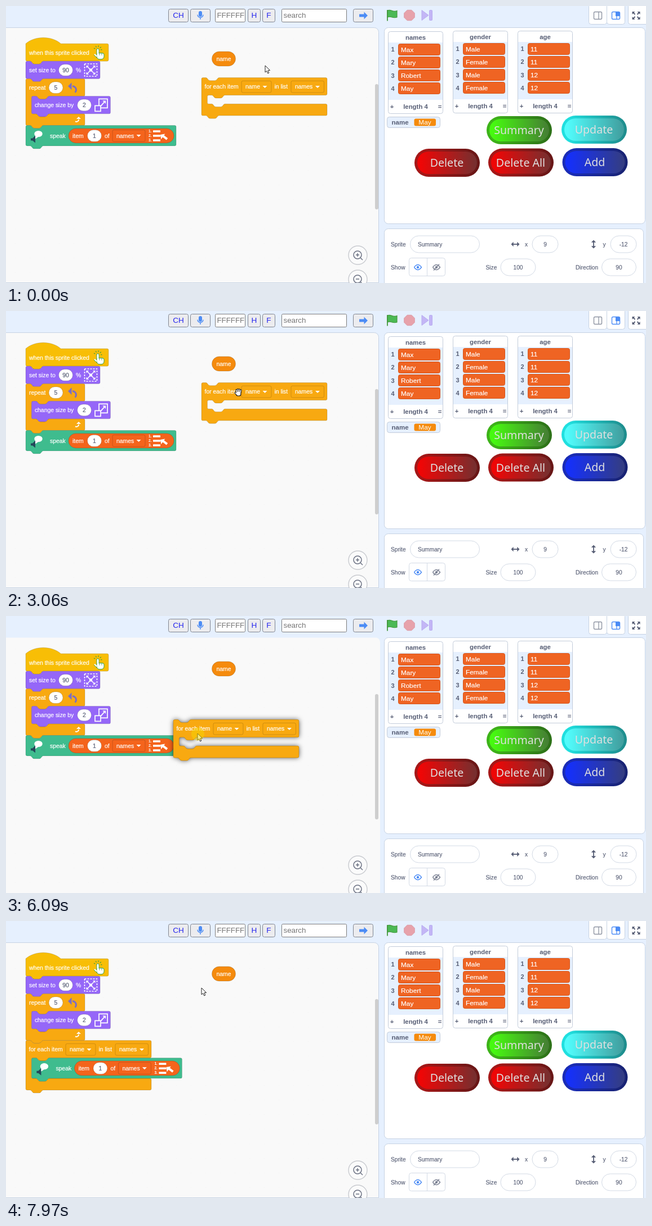
Write an HTML page with a canvas that moves like this. It is 1136 px wide and 493 px high and loops after 8000 ms.

```html
<!DOCTYPE html>
<html lang="en">
<head>
<meta charset="utf-8">
<title>Block editor</title>
<style>
html, body { margin: 0; width: 100%; height: 100%; overflow: hidden; background: #e6f0fe; }
canvas { display: block; }
</style>
</head>
<body>
<canvas id="stage" width="1136" height="493"></canvas>
<script>
const ctx = document.getElementById('stage').getContext('2d');
const LOOP = 8000, STEP = 80, UNIT = 0.65, TAU = Math.PI * 2;
const SANS = '"Liberation Sans", Arial, sans-serif';
const NOTO = '"Noto Sans", "Open Sans", sans-serif';
const SKY = '#e6f0fe', INK = '#575e75', BLUE = '#4c8cf5', EDGE = '#c6d2e3', SHADE = 'rgba(0,0,0,.16)';
const EVENT = '#f8be06', CONTROL = '#f8a911', LOOKS = '#9567f8', SPEECH = '#3fbc8e',
  LIST = '#f4641c', DATA = '#f58b0d', MARKER = '#b3b3b3';

// Paths: each takes progress k and the point where the pointer was.
const to = (x, y) => (k, [fx, fy]) => [fx + (x - fx) * k, fy + (y - fy) * k];
const orbit = (cx, cy, rx, ry, a0, a1) => k => {
  const a = (a0 + (a1 - a0) * k) * TAU / 360;
  return [cx + rx * Math.cos(a), cy + ry * Math.sin(a)];
};
const bend = (p1, p2, p3) => (k, p0) => {
  const j = 1 - k;
  return [0, 1].map(i => j * j * j * p0[i] + 3 * j * j * k * p1[i] + 3 * j * k * k * p2[i] + k * k * k * p3[i]);
};

const HOME = [460, 106], GRIP = [43, 24.5];
const GRAB = 5850, SNAP = 6490, DROP = 6960;
const MOVES = [
  [850, 1330, to(397, 61)],
  [1410, 1630, orbit(385, 88, 37, 28, -70, -430)],
  [1710, 1790, to(384, 92)],
  [1950, 2270, to(412, 149)],
  [2350, 2680, orbit(445, 149, 33, 25, 180, 57)],
  [2760, 3060, orbit(445, 149, 33, 25, 57, -170)],
  [3470, 4200, to(546, 157)],
  [4280, 4670, to(503, 153)],
  [5450, 5770, to(390, 152)],
  [GRAB + STEP, 6570, bend([460, 198], [77, 301], [76, 246.5])],
  [DROP, DROP, to(79, 250)],
  [7740, 7970, to(347, 119)]
];

function pointerAt(t) {
  let p = HOME;
  for (const [start, end, path] of MOVES) {
    if (t < start) break;
    const gaps = Math.round((end - start) / STEP);
    const done = end > start ? Math.min(gaps, Math.floor((t - start) / (end - start) * gaps + 1e-6)) : 0;
    p = path((done + 1) / (gaps + 1), p);
  }
  return p;
}

// Drawing helpers
function text(s, x, y, size, color, { align = 'left', bold = false, font = SANS, weight = 0 } = {}) {
  ctx.font = `${bold ? 'bold ' : ''}${size}px ${font}`;
  ctx.textAlign = align;
  ctx.fillStyle = ctx.strokeStyle = color;
  ctx.fillText(s, x, y + size * 0.36);
  if (weight) { ctx.lineWidth = weight; ctx.strokeText(s, x, y + size * 0.36); }
}
const label = (s, x, y, align) => text(s, x, y, 10.4, '#fff', { align, weight: 0.2 });

function paint(fill, stroke, width = 1) {
  if (fill) { ctx.fillStyle = fill; ctx.fill(); }
  if (stroke) { ctx.strokeStyle = stroke; ctx.lineWidth = width; ctx.stroke(); }
}
function box(x, y, w, h, r, fill, stroke, width) {
  ctx.beginPath();
  ctx.roundRect(x, y, w, h, r);
  paint(fill, stroke, width);
}
// A box whose one-pixel border lies inside whole pixels.
function frameBox(x, y, w, h, r, fill, stroke) {
  box(Math.round(x) + 0.5, Math.round(y) + 0.5, w - 1, h - 1, r, fill, stroke);
}
function dot(x, y, r, fill, stroke, width) {
  ctx.beginPath();
  ctx.arc(x, y, r, 0, TAU);
  paint(fill, stroke, width);
}
function shape(points, fill, stroke, width) {
  ctx.beginPath();
  points.forEach(([x, y]) => ctx.lineTo(x, y));
  ctx.closePath();
  paint(fill, stroke, width);
}
function line(color, width, x1, y1, x2, y2) {
  ctx.beginPath();
  ctx.moveTo(x1, y1);
  ctx.lineTo(x2, y2);
  paint(null, color, width);
}
function at(x, y, draw, turn = 0) {
  ctx.save();
  ctx.translate(x, y);
  ctx.rotate(turn);
  draw();
  ctx.restore();
}
// A triangle pointing right, with its tip at the given place.
function head(x, y, size, color, turn = 0) {
  at(x, y, () => shape([[0, 0], [-size, -size], [-size, size]], color), turn);
}
function corners(draw) {
  for (const i of [-1, 1]) for (const j of [-1, 1]) draw(i, j);
}

// Blocks
function notch(x, y, d) {
  ctx.lineTo(x, y);
  ctx.bezierCurveTo(x + 5 * d, y, x + 5 * d, y + 8, x + 12 * d, y + 8);
  ctx.lineTo(x + 24 * d, y + 8);
  ctx.bezierCurveTo(x + 31 * d, y + 8, x + 31 * d, y, x + 36 * d, y);
}
function block(x, y, width, fill, { hat = false, mouth = 0, tall = 48, lifted = false } = {}) {
  const w = width / UNIT, low = 48 + mouth, h = mouth ? low + 32 : tall;
  ctx.save();
  ctx.translate(x, y);
  ctx.scale(UNIT, UNIT);
  ctx.beginPath();
  if (hat) {
    ctx.moveTo(0, 0);
    ctx.bezierCurveTo(25, -22, 71, -22, 96, 0);
  } else {
    ctx.moveTo(0, 4);
    ctx.quadraticCurveTo(0, 0, 4, 0);
    notch(12, 0, 1);
  }
  ctx.arcTo(w, 0, w, 4, 4);
  if (mouth) {
    ctx.arcTo(w, 48, w - 4, 48, 4);
    notch(64, 48, -1);
    ctx.arcTo(16, 48, 16, 52, 4);
    ctx.arcTo(16, low, 20, low, 4);
    notch(28, low, 1);
    ctx.arcTo(w, low, w, low + 4, 4);
  }
  ctx.arcTo(w, h, w - 4, h, 4);
  notch(48, h, -1);
  ctx.arcTo(0, h, 0, h - 4, 4);
  ctx.closePath();
  if (lifted) {
    ctx.shadowColor = 'rgba(0,0,0,.65)';
    ctx.shadowBlur = 9;
    paint(fill);
    ctx.shadowColor = 'transparent';
  }
  paint(fill, SHADE, 1.4);
  ctx.restore();
}
function field(s, cx, cy) {
  box(cx - 12.5, cy - 10.3, 25, 20.6, 10.3, '#fff', SHADE);
  text(s, cx, cy, 10.4, INK, { align: 'center', weight: 0.2 });
}
function menu(s, x, cy, w) {
  box(x, cy - 10.4, w, 20.8, 2.6, null, SHADE);
  label(s, x + 7, cy);
  head(x + w - 11.5, cy + 2.2, 4, '#fff', TAU / 4);
}

function clickIcon() {
  const green = '#2f9e44';
  for (let a = -160; a <= 0; a += 40) {
    const c = Math.cos(a * TAU / 360), s = Math.sin(a * TAU / 360);
    line(green, 1.1, -2 + 5 * c, -6 + 5 * s, -2 + 7.5 * c, -6 + 7.5 * s);
  }
  box(-4, -8, 4, 14, 2, '#fff', green);
  box(-4, 0, 13, 11, [2, 3, 5, 5], '#fff', green);
  line('#fff', 2.6, -2, -5, -2, 5);
  line('#fff', 2.4, -4, 6, -8, 2);
  line(green, 1, -4, 8, -9, 3);
  for (const x of [1, 5]) line(green, 0.8, x, 0, x, 4);
}
function fitIcon() {
  ctx.setLineDash([3, 2]);
  box(-11, -11, 22, 22, 0, null, '#fff', 1.6);
  ctx.setLineDash([]);
  corners((i, j) => {
    line('#fff', 1.5, 0, 0, i * 6, j * 6);
    shape([[i * 8, j * 8], [i * 8, j * 3.5], [i * 3.5, j * 8]], '#fff');
  });
  box(-2.5, -2.5, 5, 5, 0, '#fff');
}
function growIcon() {
  box(-4, -11, 15, 16, 0, null, '#fff', 1.7);
  box(-11, 1, 10, 10, 0, LOOKS, '#fff', 1.7);
  line('#fff', 1.7, -1, 2, 6, -6);
  head(8, -8, 4, '#fff', -TAU / 8);
}
function undoIcon() {
  ctx.beginPath();
  ctx.arc(-1, 4, 6.5, -TAU / 4, TAU / 8);
  paint(null, '#7b6ec6', 3);
  head(-9, -2.5, 6.5, '#7b6ec6', TAU / 2);
}
function repeatIcon() {
  ctx.beginPath();
  ctx.arc(-2, 0, 4, 0, TAU / 3);
  paint(null, '#fff', 2);
  head(2, -5, 4, '#fff', -TAU / 4);
}
function speechIcon() {
  shape([[-13, 5], [-10, 5], [-5, 0], [-5, 13], [-10, 9], [-13, 9]], '#24485a');
  ctx.beginPath();
  ctx.ellipse(0.5, -3, 7.2, 5.6, 0, 0, TAU);
  paint('#fff');
  shape([[-5, 0], [-5, 6], [1, 2]], '#fff');
}
function listIcon() {
  for (let i = 0; i < 3; i++) {
    text(`${i + 1}.`, 0, i * 8, 6.5, '#fff', { bold: true });
    box(8, i * 8 - 1.6, 13, 3.4, 0.5, '#fff');
  }
  line('#fff', 4, 25, 8, 33, 14);
  head(21, 6, 6, '#fff', TAU * 0.6);
}

function speakBlock(x, y) {
  block(x, y, 267, SPEECH, { tall: 56 });
  at(x + 22, y + 18, speechIcon);
  const cy = y + 18.4;
  label('speak', x + 43, cy);
  box(x + 76, cy - 13, 187, 26, 13, LIST, SHADE);
  label('item', x + 83, cy);
  field('1', x + 122, cy);
  label('of', x + 140, cy);
  menu('names', x + 154, cy, 58);
  at(x + 218, cy - 8, listIcon);
}
function eachBlock(x, y, options) {
  block(x, y, 223, CONTROL, options);
  const cy = y + 16.2;
  label('for each item', x + 5.5, cy);
  menu('name', x + 71, cy, 53);
  label('in list', x + 129.5, cy);
  menu('names', x + 159, cy, 58.5);
}

function scripts(t, held) {
  const left = 35, inner = left + 16 * UNIT, row = 48 * UNIT;
  const rows = [0, 1, 2, 3].map(i => 67 + row * i), low = 212.5, nested = t >= SNAP;
  const mid = i => rows[i] + 15.8;
  block(left, rows[0], 147, EVENT, { hat: true });
  label('when this sprite clicked', left + 6, mid(0));
  at(165, mid(0) + 1, clickIcon);
  block(left, rows[1], 132, LOOKS);
  label('set size to', left + 6, mid(1));
  field('90', 106, mid(1));
  label('%', 124, mid(1));
  at(150.5, mid(1), fitIcon);
  block(left, rows[2], 105, CONTROL, { mouth: 48 });
  label('repeat', left + 6, mid(2));
  field('5', 88.5, mid(2));
  at(119, mid(2), undoIcon);
  at(127, 202, repeatIcon);
  block(inner, rows[3], 140, LOOKS);
  label('change size by', inner + 5.5, mid(3));
  field('2', 139, mid(3));
  at(169, mid(3), growIcon);

  if (t >= DROP) eachBlock(left, low, { mouth: 56 });
  else if (nested) block(left, low, 223, MARKER, { mouth: 56 });
  if (nested) speakBlock(inner, low + row);
  else speakBlock(left, low);

  box(365.5, 81, 42, 26, 13, DATA, SHADE);
  label('name', 386.5, 94, 'center');
  if (t < DROP) {
    const [x, y] = pointerAt(held ? t : GRAB);
    eachBlock(x - GRIP[0], y - GRIP[1], { mouth: 24, lifted: held });
  }
}

// Workspace and header
function workspace(t, held) {
  const right = held ? 664 : 661.5;
  box(-10, 38.5, right + 10, held ? 470 : 454, [0, 8, 0, 0], '#f9f9f9', held ? null : EDGE);
  ctx.fillStyle = '#f3f3f3';
  for (let x = 16; x < 655; x += 26)
    for (let y = 58; y < 490; y += 26) ctx.fillRect(x, y, 1, 1);
  scripts(t, held);
  box(655, 139, 6, 223, 3, '#cecece');
  for (const cy of [443.5, 486.5]) {
    dot(624.5, cy, 16.5, '#fbfbfb', '#c9cbd0', 1.4);
    dot(624, cy - 0.5, 7, null, '#6a7082', 1.5);
    line('#6a7082', 1.5, 629, cy + 4.5, 633, cy + 8.5);
    line('#6a7082', 1.5, 621, cy - 0.5, 627, cy - 0.5);
    if (cy < 450) line('#6a7082', 1.5, 624, cy - 3.5, 624, cy + 2.5);
  }
}
function button(x, w, s = '') {
  frameBox(x, 5, w, 24, 3, '#ececef', '#80858f');
  text(s, x + w / 2, 16.5, 13.6, '#2828ee', { align: 'center' });
}
function input(x, w, s) {
  frameBox(x, 5, w, 24, 2, '#fff', '#7c7c7c');
  text(s, x + 3.5, 16.5, 13.3, '#757575');
}
function header() {
  button(288, 36, 'CH');
  button(327, 36);
  button(429, 23, 'H');
  button(455, 23, 'F');
  button(616, 36);
  input(371, 54, 'FFFFFF');
  input(489, 116, 'search');
  box(342, 9, 6, 10, 3, BLUE);
  ctx.beginPath();
  ctx.arc(345, 15.5, 5, 0, Math.PI);
  paint(null, BLUE, 1.4);
  line(BLUE, 1.4, 345, 20, 345, 24);
  line(BLUE, 5, 627, 17, 636, 17);
  head(642, 17, 6.5, BLUE);

  ctx.beginPath();
  ctx.moveTo(677, 8);
  ctx.bezierCurveTo(684, 5, 686, 12, 694, 8.5);
  ctx.lineTo(694, 20);
  ctx.bezierCurveTo(686, 23, 684, 17, 677, 20);
  ctx.closePath();
  paint('#4cb955', '#45993d', 1.2);
  line('#45993d', 1.8, 677, 7, 677, 26.5);
  const octagon = Array.from({ length: 8 }, (_, i) => {
    const a = (i + 0.5) * TAU / 8;
    return [716 + 10 * Math.cos(a), 16.5 + 10 * Math.sin(a)];
  });
  shape(octagon, '#e7a2ab', '#dc98a4');
  shape([[738, 7.5], [750, 16.5], [738, 25.5]], '#c3b6f6', '#b8abf0');
  box(751.5, 7.5, 5, 18, 1, '#c3b6f6', '#b8abf0');

  for (const [x, color] of [[1034, '#8f95a3'], [1066, BLUE]]) {
    frameBox(x, -4, 33, 37, 4, '#fff', EDGE);
    box(x + 9.5, 10.5, 14, 13, 2, null, color, 1.4);
    if (color === BLUE) box(x + 16, 11, 7.5, 7, 0, color);
    line(color, 1.3, x + 18, 11, x + 18, 23);
  }
  frameBox(1104, -4, 37, 37, 4, '#fff', EDGE);
  corners((i, j) => {
    line(INK, 2, 1118.5 + i * 2, 17 + j * 2, 1118.5 + i * 5, 17 + j * 5);
    head(1118.5 + i * 7, 17 + j * 7, 3.5, INK, Math.atan2(j, i));
  });
}

// Stage and sprite panel
function listMonitor(x, y, title, items) {
  const style = { align: 'center', bold: true };
  frameBox(x, y, 98, 147, 4, '#fff', '#c3ccda');
  ctx.fillStyle = SKY;
  ctx.fillRect(x + 1, y + 20, 96, 102);
  text(title, x + 49, y + 11, 11.4, INK, style);
  items.forEach((item, i) => {
    const cy = y + 32.3 + i * 23.2;
    text(i + 1, x + 8.5, cy, 11, INK, style);
    frameBox(x + 18, cy - 10.5, 75, 21, 3, '#ef6423', '#d6551b');
    text(item, x + 23, cy, 11.8, '#fff', { weight: 0.2 });
  });
  const foot = y + 133.5;
  text('+', x + 7, foot, 11.4, INK, style);
  text(`length ${items.length}`, x + 49, foot, 11.4, INK, style);
  text('=', x + 92, foot, 11.4, INK, style);
}
function pill(x, y, s, hue, light) {
  const blend = (s1, l1, s2, l2) => {
    const g = ctx.createLinearGradient(x, 0, x + 116, 0);
    g.addColorStop(0.1, `hsl(${hue} ${s1}% ${light * l1}%)`);
    g.addColorStop(0.95, `hsl(${hue} ${s2}% ${light * l2}%)`);
    return g;
  };
  box(x, y, 116, 50, 25, blend(75, 0.77, 65, 0.52));
  box(x + 5, y + 5, 106, 40, 20, blend(95, 1, 42, 0.67));
  text(s, x + 57.5, y + 25, 19.6, '#dfdfdf', { align: 'center', font: NOTO });
}
function stage() {
  frameBox(671, 38, 464, 350, 7, '#fff', EDGE);
  listMonitor(678, 45, 'names', ['Max', 'Mary', 'Robert', 'May']);
  listMonitor(793, 44, 'gender', ['Male', 'Female', 'Male', 'Female']);
  listMonitor(908, 44, 'age', ['11', '11', '12', '12']);
  frameBox(676, 197, 95, 20, 4, SKY, '#c3ccda');
  text('name', 684.5, 207, 11.5, INK, { bold: true });
  box(724.5, 200.5, 38.5, 13, 3, DATA);
  text('May', 743.5, 207, 11.8, '#fff', { align: 'center' });
  pill(853, 196, 'Summary', 106, 52);
  pill(986, 195, 'Update', 180, 65);
  pill(725, 254, 'Delete', 0, 48);
  pill(856, 253.5, 'Delete All', 0, 48);
  pill(987.5, 253, 'Add', 233, 53);
}
function eye(x, y, color) {
  ctx.beginPath();
  ctx.moveTo(x - 6.5, y);
  ctx.quadraticCurveTo(x, y - 9, x + 6.5, y);
  ctx.quadraticCurveTo(x, y + 9, x - 6.5, y);
  paint(null, color, 1.4);
  dot(x, y, 2.2, color);
}
function doubleArrow() {
  line(INK, 1.8, -4, 0, 4, 0);
  head(7.5, 0, 4.2, INK);
  head(-7.5, 0, 4.2, INK, TAU / 2);
}
function value(name, s, x, cx, y, w) {
  text(name, x, y, 10.2, INK, { weight: 0.15 });
  box(cx - w / 2, y - 15, w, 30, 15, '#fff', '#d3dae5');
  text(s, cx, y, 10.2, INK, { align: 'center', weight: 0.15 });
}
function panel() {
  const top = 424, low = 465;
  frameBox(671, 396, 461, 111, 7, '#fff', EDGE);
  value('Sprite', '', 683, 779, top, 123);
  text('Summary', 731, top, 10.1, INK, { weight: 0.15 });
  value('x', '9', 921, 957, top, 46);
  value('y', '-12', 1059.5, 1096, top, 46);
  value('Size', '100', 851.5, 909, low, 62);
  value('Direction', '90', 1011, 1088, low, 61);
  text('Show', 683, low, 10.2, INK, { weight: 0.15 });
  at(904, top, doubleArrow);
  at(1043, top, doubleArrow, TAU / 4);
  frameBox(715, 448, 65, 33, 4, '#fff', '#d3dae5');
  line('#d3dae5', 1, 747.5, 448, 747.5, 481);
  eye(731, low, BLUE);
  eye(764, low, '#7d8395');
  line('#7d8395', 1.4, 759, low + 5.5, 769, low - 5.5);
}

// Pointer
function arrowPointer() {
  shape([[0, 0], [0, 12], [2.8, 9.6], [4.8, 14], [6.8, 13], [4.9, 8.8], [8.6, 8.6]], '#fff', '#222');
}
function handPointer() {
  ctx.lineCap = 'round';
  for (const [color, grow] of [['#111', 1], ['#fff', 0]]) {
    box(-3.4 - grow, -1 - grow, 7.2 + grow * 2, 6.8 + grow * 2, 3, color);
    for (let i = 0; i < 4; i++)
      line(color, 1.5 + grow * 2, -3 + i * 2.2, 0, -3.6 + i * 2.6, -5.2 + Math.abs(i - 1.4) * 0.9);
    line(color, 1.5 + grow * 2, -2.5, 3.5, -5.2, 1);
  }
}
function grabbable(x, y, t) {
  const within = (l, top, r, b) => x >= l && x <= r && y >= top && y <= b;
  const loopBlock = t < DROP ? within(347, 127, 570, 195) : within(35, 212, 258, 301);
  return loopBlock || within(365, 81, 407, 108);
}
function pointer(t, held) {
  const [x, y] = pointerAt(t);
  at(x, y, !held && grabbable(x, y, t) ? handPointer : arrowPointer);
  if (held) dot(x + 0.5, y + 1, 11.5, 'rgba(246,214,0,.5)');
}

function frame() {
  const t = performance.now() % LOOP, held = t >= GRAB && t < DROP;
  ctx.fillStyle = SKY;
  ctx.fillRect(0, 0, 1136, 493);
  header();
  workspace(t, held);
  stage();
  panel();
  pointer(t, held);
  requestAnimationFrame(frame);
}
frame();
</script>
</body>
</html>
```
